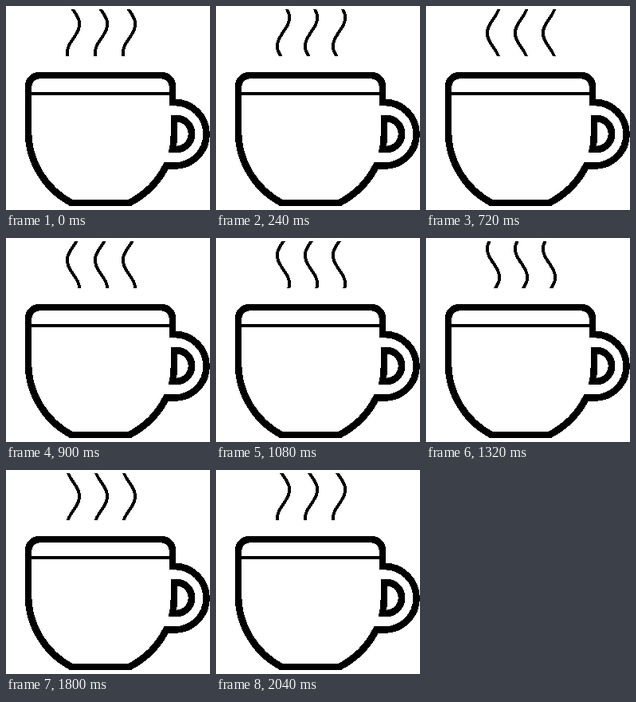
An HTML page that plays this animation: 256 by 256 pixels, repeating every 2.1 s.

```html
<!DOCTYPE html>
<html lang="en">
<head>
<meta charset="utf-8">
<title>Steaming cup</title>
<style>
  html, body { margin: 0; width: 100%; height: 100%; overflow: hidden; background: #fff; }
  svg { display: block; width: 100vw; height: 100vh; }
</style>
</head>
<body>
<svg viewBox="0 0 256 256" fill="none" stroke="#000" shape-rendering="crispEdges">
  <clipPath id="window"><rect x="70" y="4" width="100" height="59"/></clipPath>
  <g id="steam" stroke-width="3.9" clip-path="url(#window)">
    <path/><path/><path/>
  </g>
  <g stroke-width="8.7">
    <path d="M28 101A14 14 0 0 1 42 87H195A14 14 0 0 1 209 101V121H211.8A39.75 39.75 0 0 1 211.8 200.5H201C191 221 174 237 155 247H82C50 230 28 196 28 157Z"/>
    <path d="M211 141H213.5A19.5 19.5 0 0 1 213.5 180H209Q211 170 211 157Z"/>
  </g>
  <path d="M28 110H209" stroke-width="4"/>
</svg>
<script>
  const LOOP = 2100, STEP = 60;
  const CENTER = 84.5, SWING = 7.6, WAVELENGTH = 71, SPACING = 35;
  const MIDDLE = 33.5, MIRROR_TIME = 735;
  const wisps = document.querySelectorAll('#steam path');

  function waveX(y, time) {
    const turns = (y - MIDDLE) / WAVELENGTH + (time - MIRROR_TIME) / LOOP;
    return CENTER - SWING * Math.cos(2 * Math.PI * turns);
  }

  function draw(time) {
    wisps.forEach((wisp, i) => {
      const points = [];
      for (let y = 0; y <= 67; y++) {
        points.push(`${(waveX(y, time) + i * SPACING).toFixed(2)} ${y}`);
      }
      wisp.setAttribute('d', 'M' + points.join('L'));
    });
  }

  const start = performance.now();
  function tick() {
    const elapsed = (performance.now() - start) % LOOP;
    draw(Math.floor(elapsed / STEP) * STEP);
    requestAnimationFrame(tick);
  }
  tick();
</script>
</body>
</html>
```
